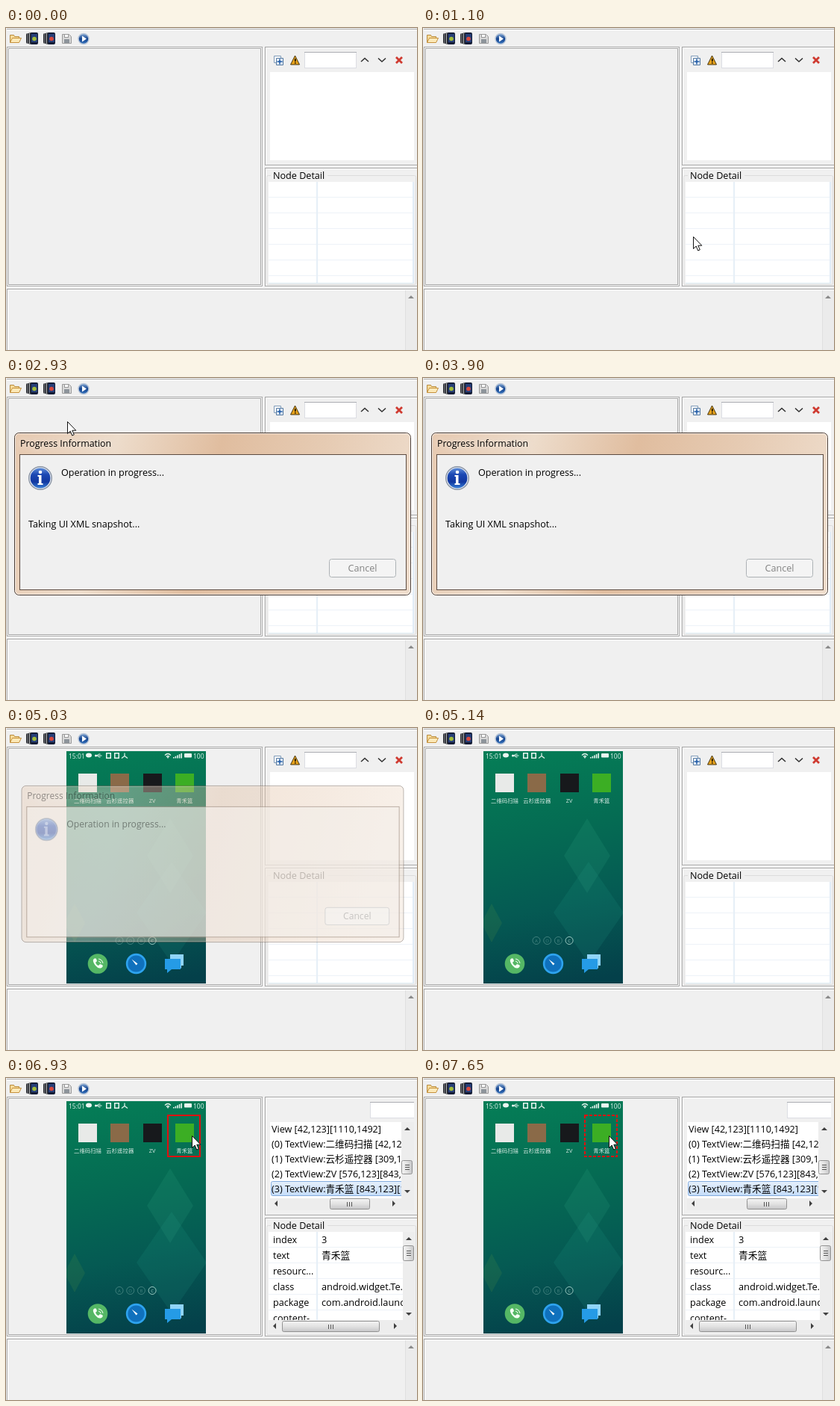
An HTML page with a canvas for the animation above (8 s loop, 551 by 431 pixels).

```html
<!DOCTYPE html>
<html lang="en">
<head>
<meta charset="utf-8">
<title>UI inspector capture</title>
<style>
html, body { margin: 0; width: 100%; height: 100%; overflow: hidden; background: #f0f0f0; }
canvas { display: block; }
</style>
</head>
<body>
<canvas id="stage" width="551" height="431"></canvas>
<script>
const ctx = document.getElementById('stage').getContext('2d');
const LOOP = 8000;
const FONT = '"Open Sans", "Noto Sans CJK SC", "Noto Sans CJK", sans-serif';

// Drawing helpers
const rect = (x, y, w, h, fill) => { ctx.fillStyle = fill; ctx.fillRect(x, y, w, h); };
const frame = (x, y, w, h, color, width = 1) => {
  ctx.strokeStyle = color;
  ctx.lineWidth = width;
  ctx.strokeRect(x + width / 2, y + width / 2, w - width, h - width);
};
const paint = (fill, stroke, width = 1) => {
  if (fill) { ctx.fillStyle = fill; ctx.fill(); }
  if (stroke) { ctx.strokeStyle = stroke; ctx.lineWidth = width; ctx.stroke(); }
};
const round = (x, y, w, h, r, fill, stroke, width) => {
  ctx.beginPath(); ctx.roundRect(x, y, w, h, r); paint(fill, stroke, width);
};
const circle = (x, y, r, fill, stroke, width) => {
  ctx.beginPath(); ctx.arc(x, y, r, 0, 2 * Math.PI); paint(fill, stroke, width);
};
const path = (d, x, y, fill, stroke, width = 1) => {
  const p = new Path2D(d);
  ctx.save();
  ctx.translate(x, y);
  if (fill) { ctx.fillStyle = fill; ctx.fill(p); }
  if (stroke) { ctx.strokeStyle = stroke; ctx.lineWidth = width; ctx.stroke(p); }
  ctx.restore();
};
const text = (s, x, y, size = 12.6, color = '#000', align = 'left') => {
  ctx.font = `${size}px ${FONT}`;
  ctx.fillStyle = color;
  ctx.textAlign = align;
  ctx.fillText(s, x, y);
};
const gradient = (x0, y0, x1, y1, ...colors) => {
  const g = ctx.createLinearGradient(x0, y0, x1, y1);
  colors.forEach((c, i) => g.addColorStop(i / (colors.length - 1), c));
  return g;
};
const clipped = (x, y, w, h, draw) => {
  ctx.save();
  ctx.beginPath(); ctx.rect(x, y, w, h); ctx.clip();
  draw();
  ctx.restore();
};

// Timing helpers: progress in n equal jumps, the first at a and the last at b
const steps = (t, a, b, n) =>
  t < a ? 0 : Math.min(1, (Math.floor((t - a) * (n - 1) / (b - a) + 1e-6) + 1) / n);
const easeOut = p => 1 - (1 - p) ** 1.6;
const between = (from, to, p) => from.map((v, i) => Math.round(v + (to[i] - v) * p));

function cursorAt(t) {
  if (t < 980) return null;
  if (t < 1870) return between([551, 431], [40, 18], easeOut(steps(t, 980, 1770, 8)));
  if (t < 3800) return between([40, 16], [378, 351], steps(t, 2930, 3680, 8));
  if (t < 3900) return [418, 395];
  if (t < 5500) return null;
  if (t < 5960) return between([551, 431], [259, 84], easeOut(steps(t, 5500, 5840, 4)));
  return [249, 77];
}

// Etched border: a grey line with a white one down and to the right of it
function panel(x, y, w, h) {
  frame(x + 1, y + 1, w, h, '#fff');
  frame(x, y, w, h, '#a5a5a5');
}

function phoneIcon(x, dot) {
  for (let i = 0; i < 3; i++) {
    round(x + i * 2.5, 7 - i * .4, 9, 14 + i * .8, 2, '#26282e');
    rect(x + i * 2.5 + 1.7, 7, .8, 14, '#d5d7db');
  }
  round(x + 6, 6, 10, 16, 2, '#151d36');
  rect(x + 7, 8, 8, 11, '#263f78');
  circle(x + 11, 14.5, 2.8, dot);
}

function toolbar(t) {
  rect(0, 0, 551, 1, '#fafafa');
  rect(1, 1, 550, 1, '#a5a5a5');
  rect(1, 2, 550, 1, '#fff');
  if (t >= 1770 && t < 2300) {
    const pressed = t >= 1870;
    round(24.5, 4.5, 22, 19, 2.5, pressed ? '#cfcfcf' : '#e9e9e9', pressed ? '#555' : '#999');
  }
  path('M0 11V1h5l1 2h6v3', 5.5, 8.5, '#f7dc9b', '#b98b3c');
  path('M0 11l3-6h12l-3 6z', 5.5, 8.5, '#fce9b8', '#c6913c');
  phoneIcon(27, '#a4bd3a');
  phoneIcon(50, '#d8493c');
  path('M0 0h9l3 3v9H0z', 75.5, 8.5, '#d8d8d8', '#9a9a9a');
  rect(78, 8, 6, 5, '#fff');
  frame(78, 8, 6, 5, '#999');
  rect(78, 15, 7, 5, '#8d949b');
  circle(104, 14.5, 7, gradient(0, 7, 0, 22, '#8fb4dd', '#14448f', '#3b78c2'), '#b9c6d8', 1.5);
  path('M0 0l6 4-6 4z', 102, 10.5, '#fff');
}

const ARROWS = {
  up: 'M-4 2L0-2 4 2z', down: 'M-4-2L0 2 4-2z',
  left: 'M2-4L-2 0 2 4z', right: 'M-2-4L2 0-2 4z',
};
const arrow = (dir, x, y, color = '#404040') => path(ARROWS[dir], x, y, color);

function thumb(x, y, w, h, vertical) {
  const fill = vertical ? gradient(x, 0, x + w, 0, '#f5f5f5', '#e2e2e2', '#c4c4c6')
                        : gradient(0, y, 0, y + h, '#f5f5f5', '#e2e2e2', '#c4c4c6');
  round(x + .5, y + .5, w - 1, h - 1, 2, fill, '#929292');
  const cx = Math.round(x + w / 2), cy = Math.round(y + h / 2);
  for (let i = -1; i < 2; i++) {
    if (vertical) rect(cx - 3, cy + i * 3 - 1, 6, 1, '#555');
    else rect(cx + i * 3 - 1, cy - 3, 1, 6, '#555');
  }
}

function searchField(x) {
  rect(x, 32, 70, 22, '#fff');
  frame(x, 32, 70, 22, '#dcdde3');
  rect(x, 32, 70, 1, '#abadb3');
}

function treeTools() {
  round(359.5, 37.5, 9, 9, 0, '#fff', '#7e9ab8');
  round(362.5, 40.5, 9, 9, 0, '#eaf3fb', '#55789f');
  path('M0 4h7M3.5.5v7', 363.5, 41, null, '#1d58a5', 1.6);
  path('M6 0L12 12H0z', 381.5, 37, '#e8a31c', '#453512');
  rect(387, 41, 1.5, 4, '#000');
  rect(387, 46, 1.5, 1.5, '#000');
  searchField(400);
  path('M0 4.5L5 0l5 4.5', 476, 40.5, null, '#333', 1.6);
  path('M0 0l5 4.5L10 0', 499, 40.5, null, '#333', 1.6);
  path('M0 0l8 8M8 0L0 8', 523, 39, null, '#cf3a30', 2.8);
}

function tree(t, loaded) {
  panel(347, 25, 210, 159);
  if (!loaded) {
    treeTools();
    rect(354, 59, 193, 118, '#fff');
    return;
  }
  clipped(488, 32, 59, 22, () => searchField(488));
  rect(354, 59, 176, 102, '#fff');
  rect(530, 59, 17, 102, '#ededed');
  rect(354, 161, 193, 16, '#ededed');
  arrow('up', 538, 68);
  arrow('down', 538, 152);
  thumb(530, 110, 15, 19, true);
  arrow('left', 362, 168);
  arrow('right', 520, 168);
  thumb(434, 161, 54, 15);
  if (t < 5960) return;
  clipped(354, 59, 176, 102, () => {
    const strong = t >= 6680;
    round(355.5, 138.5, 180, 19, 2,
      gradient(0, 139, 0, 158, strong ? '#e4effc' : '#f0f6fd', strong ? '#c4dcfa' : '#dceafb'),
      strong ? '#84acdd' : '#b8d2ee');
    ['View [42,123][1110,1492]', '(0) TextView:二维码扫描 [42,123][309,465]',
     '(1) TextView:云杉遥控器 [309,123][576,465]', '(2) TextView:ZV [576,123][843,465]',
     '(3) TextView:青禾篮 [843,123][1110,465]',
    ].forEach((s, i) => text(s, 356, 73 + i * 20));
  });
}

function details(t, loaded) {
  panel(347, 187, 210, 159);
  round(349.5, 197.5, 200, 146, 2, null, '#dcdcdc');
  rect(355, 196, 76, 4, '#f0f0f0');
  text('Node Detail', 358, 202);
  const w = loaded ? 180 : 195, h = loaded ? 118 : 136;
  rect(352, 206, w, h, '#fff');
  for (let y = 226; y < 206 + h; y += 21) rect(352, y, w, 1, '#edf2f8');
  rect(416, 206, 2, h, '#e6eff7');
  if (!loaded) {
    rect(545, 206, 2, 136, '#e2edf7');
    rect(352, 341, 195, 1, '#dcebf2');
    return;
  }
  rect(532, 206, 16, 118, '#ededed');
  rect(352, 324, 196, 17, '#ededed');
  arrow('up', 540, 215);
  arrow('down', 540, 316);
  thumb(532, 224, 15, 21, true);
  arrow('left', 360, 332);
  arrow('right', 522, 332);
  thumb(370, 325, 131, 15);
  if (t < 5960) return;
  clipped(352, 206, 180, 118, () => [
    ['index', '3'], ['text', '青禾篮'], ['resourc...', ''],
    ['class', 'android.widget.Te...'], ['package', 'com.android.launcher'], ['content-...', ''],
  ].forEach(([key, value], i) => {
    text(key, 358, 221 + i * 21);
    text(value, 423, 221 + i * 21, 12.8);
  }));
}

const diamond = (x, y, w, h, fill) => path(`M0 ${-h}L${w} 0 0 ${h} ${-w} 0z`, x, y, fill);

function statusBar() {
  const white = '#eaf5f0';
  text('15:01', 84, 40.5, 8.5, white);
  ctx.beginPath(); ctx.ellipse(111, 36.5, 4, 3, 0, 0, 7); paint(white);
  path('M0 3h9M2 3l3-2h2M3 3l2 2h2', 119.5, 34, null, white);
  circle(120.5, 37, 1.5, white);
  [134, 145].forEach(x => { frame(x, 33, 7, 8, white, 1.5); });
  path('M4 0v4L0 7M4 4l4 3', 155, 33.5, null, white, 1.2);
  path('M0 2q4-4 8 0M2 4q2-2 4 0', 213, 34.5, null, white, 1.2);
  circle(217, 39.5, 1, white);
  for (let i = 0; i < 5; i++) rect(224 + i * 2.6, 39 - i * 1.3, 1.6, 1.5 + i * 1.3, white);
  round(239, 34, 10, 5.5, 1, white);
  text('100', 265.5, 40.5, 8.5, white, 'right');
}

function dock() {
  circle(123, 315.5, 13.3, '#55b765');
  path('M-6-5q2-3 4-1l1 3-2 2q1 3 4 4l2-2 3 1q2 2-1 4-4 2-8-3t-3-8z', 123, 315, '#f2fff4');
  path('M1-6q5 1 6 6M1-3q3 1 3 3', 123, 315, null, '#e4f7e6', 1.1);
  circle(174.5, 315.5, 12.4, '#1071bd', '#2ea3ee', 2.6);
  path('M-6-6L2 0 0 2z', 174.5, 315.5, '#fff');
  path('M0 0h18v15h-3v4l-5-4H0z', 220, 303, '#8fd4f8');
  path('M0 0h21v14H9l-6 5v-5H0z', 213, 309, '#259be6');
}

function phone(t) {
  clipped(81, 31, 187, 311, () => {
    rect(81, 31, 187, 311, gradient(145, 31, 205, 342, '#057c56', '#056c53', '#055a53', '#04404a'));
    diamond(220, 171, 31, 50, 'rgba(70,190,150,.12)');
    diamond(222, 247, 47, 68, 'rgba(40,170,150,.12)');
    diamond(92, 261, 14, 26, 'rgba(120,170,60,.12)');
    statusBar();
    [['二维码扫描', '#e8eae8'], ['云杉遥控器', '#8a6a48'], ['ZV', '#17191c'], ['青禾篮', '#3cae24']]
      .forEach(([label, color], i) => {
        const x = 109.5 + i * 43.3;
        rect(Math.round(x - 12.5), 61, 25, 25, color);
        text(label, x, 99.5, 7.4, '#d8ebe4', 'center');
      });
    [...'AOBC'].forEach((c, i) => {
      const x = 152 + i * 14.7, color = `rgba(190,230,220,${i === 3 ? .9 : .35})`;
      circle(x, 284.5, 5, null, color, .9);
      text(c, x, 286.8, 6, color, 'center');
    });
    dock();
    if (t >= 6680) {
      ctx.setLineDash(t >= 7530 ? [4, 2] : []);
      frame(216, 49, 45, 57, '#e01010', 2);
    }
  });
}

function dialog(opacity) {
  ctx.save();
  ctx.globalAlpha = opacity;
  const size = .94 + .06 * opacity;
  ctx.translate(277, 182); ctx.scale(size, size); ctx.translate(-277, -182);
  round(11.5, 73.5, 531, 217, 6,
    gradient(11, 74, 543, 200, '#e6c9b0', '#eddccb', '#e0bd9f', '#e6cbb3', '#eedccb'), '#4b3c33');
  round(12.5, 74.5, 529, 215, 5, null, 'rgba(255,255,255,.65)');
  ctx.save();
  ctx.shadowColor = '#fff';
  ctx.shadowBlur = 9;
  text('Progress Information', 19, 92, 12.4);
  ctx.restore();
  rect(18, 102, 519, 182, '#f6e9dd');
  rect(19, 103, 517, 180, '#f0f0f0');
  frame(18, 102, 519, 182, '#5d4b40');
  circle(46, 134, 15, gradient(0, 119, 0, 149, '#6d9be0', '#1c49b4', '#1238a0', '#3f8be0'), '#8b95a5', 2);
  circle(46, 134, 14, null, '#e3e9f2', 1.2);
  circle(46, 126, 2.3, '#fff');
  path('M0 0h5v11h2v2H0v-2h1.5V2H0z', 42.5, 130, '#fff');
  text('Operation in progress...', 74, 131);
  round(433.5, 242.5, 89, 24, 3, '#f4f4f4', '#adb2b5');
  text('Cancel', 478, 259, 12.6, '#838383', 'center');
  ctx.restore();
}

function draw(t) {
  const loaded = t >= 5840;
  rect(0, 0, 551, 431, '#f0f0f0');
  toolbar(t);
  panel(1, 25, 343, 321);
  panel(3, 27, 339, 317);
  tree(t, loaded);
  details(t, loaded);
  panel(1, 349, 560, 90);
  rect(535, 351, 16, 80, '#ebebeb');
  rect(535, 351, 1, 80, '#e0e0e0');
  arrow('up', 543, 360, '#8a8a8a');
  if ((t >= 5030 && t < 5840) || t >= 5960) phone(t);
  if (t >= 2300 && t < 5140) dialog(t < 5030 ? steps(t, 2300, 2630, 4) : .4);
  if (t >= 2930 && t < 5030) text('Taking UI XML snapshot...', 30, 200);
  const at = cursorAt(t);
  if (at) path('M.5.5v16l3.7-3.5 2.5 6 2.6-1.1-2.5-5.7h5z', ...at, '#fff', '#111');
}

const start = performance.now();
function tick() {
  draw((performance.now() - start) % LOOP);
  requestAnimationFrame(tick);
}
tick();
</script>
</body>
</html>
```
